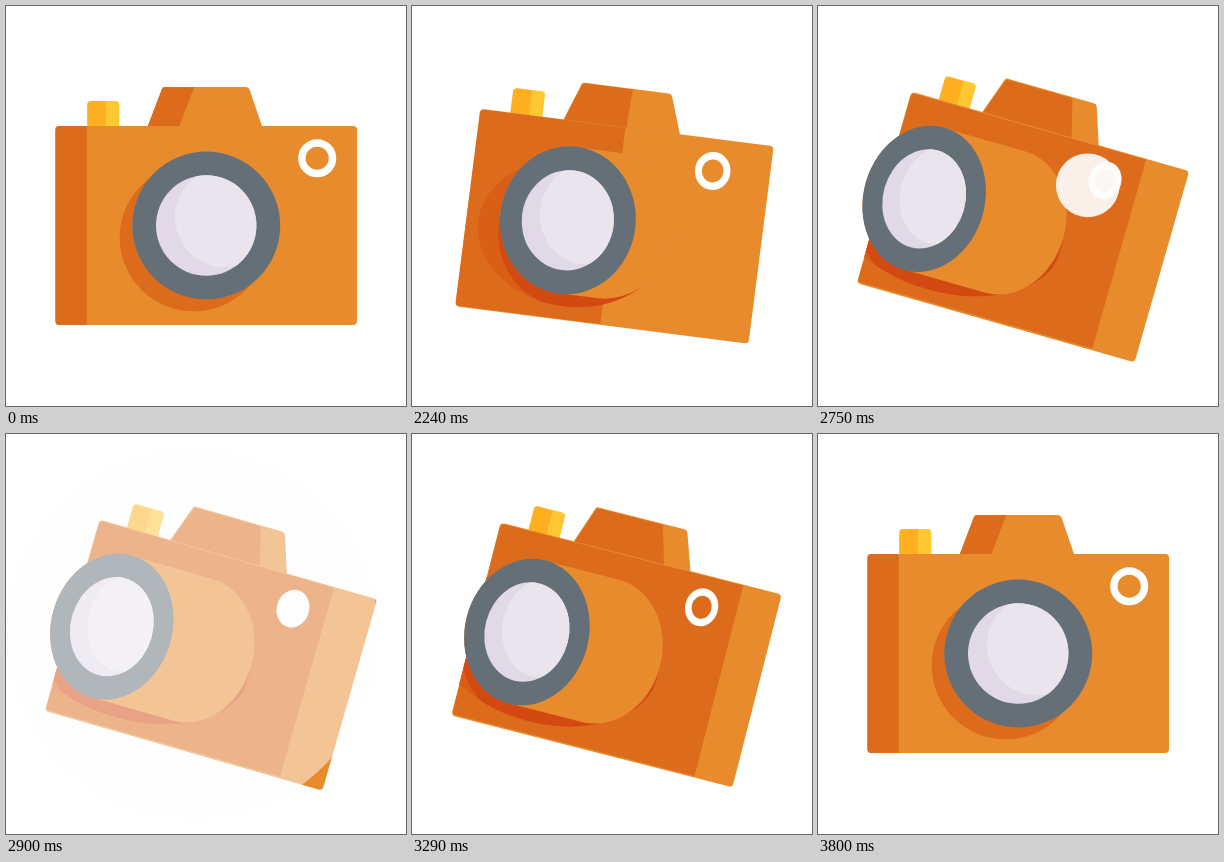
Write an HTML page with a canvas that moves like this. It is 400 by 400 pixels and loops after 3830 ms.

```html
<!DOCTYPE html>
<html lang="en">
<head>
<meta charset="utf-8">
<title>Camera</title>
<style>
html, body { margin: 0; width: 100%; height: 100%; overflow: hidden; background: #fff; }
canvas { display: block; width: 400px; height: 400px; }
</style>
</head>
<body>
<canvas id="stage" width="400" height="400"></canvas>
<script>
const ctx = document.getElementById('stage').getContext('2d');
const LOOP = 3830, MAX_ANGLE = 16;
const LIGHT = '#e88b2d', DARK = '#dc6b1b', SHADE = '#d95f16', DEEP = '#d24a11';

const clamp = v => Math.max(0, Math.min(1, v));

// cubic-bezier(.33, 0, .2, 1)
function ease(p) {
  let lo = 0, hi = 1;
  for (let i = 0; i < 24; i++) {
    const u = (lo + hi) / 2, v = 1 - u;
    if (3 * v * v * u * .33 + 3 * v * u * u * .2 + u ** 3 < p) lo = u; else hi = u;
  }
  return lo * lo * (3 - 2 * lo);
}

// 0 = facing front, 1 = fully turned
function turnAt(t) {
  const p = t < 2900 ? (t - 1985) / 840 : (3800 - t) / 820;
  return p <= 0 ? 0 : p >= 1 ? 1 : ease(p);
}

function fill(path, color) {
  ctx.fillStyle = color;
  ctx.fill(path);
}

function ellipse(x, y, rx, ry = rx) {
  const path = new Path2D();
  path.ellipse(x, y, rx, ry, 0, 0, 7);
  return path;
}

function box(x1, y1, x2, y2, radius = 0) {
  const path = new Path2D();
  path.roundRect(x1, y1, x2 - x1, y2 - y1, radius);
  return path;
}

// Two equal ellipses joined by straight sides
function tube(x1, x2, y, rx, ry) {
  const path = new Path2D();
  path.ellipse(x1, y, rx, ry, 0, Math.PI / 2, Math.PI * 1.5);
  path.ellipse(x2, y, rx, ry, 0, -Math.PI / 2, Math.PI / 2);
  path.closePath();
  return path;
}

function trapezoid(bottomL, topL, topR, bottomR, top, rL, rR) {
  const path = new Path2D();
  path.moveTo(bottomL, -99);
  path.arcTo(topL, top, topR, top, rL);
  path.arcTo(topR, top, bottomR, -99, rR);
  path.lineTo(bottomR, -99);
  path.closePath();
  return path;
}

function drawBody(e, slide) {
  const half = 150.8 - 6.4 * e;
  const body = box(-half, -99.5, half, 99.5, 4);

  const bx = 3 * e;
  fill(box(-119 + bx, -124.5, -87 + bx, -98, [4, 4, 0, 0]), '#ffb021');
  fill(box(-100.3 + bx, -124.5, -87 + bx, -98, [0, 4, 0, 0]), '#ffc732');

  const bl = -58.5 - 12.5 * e, tl = -43.5 - 14 * e;
  fill(trapezoid(bl, tl, 42.5 - 5.5 * e, 56 - 5.5 * e, -138.5, 3, 4), LIGHT);
  fill(trapezoid(bl + e, tl + e, -12 + .11 * slide, -27 + .225 * slide, -138.5 + e, 3, 0), DARK);

  fill(body, LIGHT);
  fill(box(-half + .5 * e, -99.5 + e, -119.5 + slide, 99.5 - 1.8 * e, [4, 0, 0, 4]), DARK);
  return body;
}

function drawLens(e, angle, body) {
  const x = -6.45 * angle, base = -19 * e, sx = 1 - .0113 * angle;
  const rx = 74 * sx, shadow = ellipse(-12.5 - 63 * e, 12, 74 + 45 * e, 74);

  ctx.save();
  ctx.clip(body);
  fill(shadow, DARK);
  ctx.globalAlpha = clamp(3 * e);
  fill(shadow, SHADE);
  ctx.clip(shadow);
  fill(tube(x, base, 12, rx, 74), DEEP);
  ctx.restore();

  fill(tube(x, base, 0, rx, 73.5), LIGHT);

  ctx.save();
  ctx.translate(x, 0);
  ctx.scale(sx, 1);
  fill(ellipse(0, 0, 74), '#646f78');
  const glass = ellipse(0, 0, 50.2);
  fill(glass, '#e1d9e6');
  ctx.clip(glass);
  fill(ellipse(19, -8.5, 50.2), '#eae5ec');
  ctx.restore();
}

function drawWindow(e, flash) {
  ctx.save();
  ctx.translate(111 - 45 * e, -67.3);
  ctx.scale(1 - .15 * e, 1);
  ctx.strokeStyle = '#fff';
  ctx.lineWidth = 7.5;
  ctx.stroke(ellipse(0, 0, 15.3));
  if (flash > 0 && flash < 1) {
    ctx.globalAlpha = clamp(2 * Math.sin(Math.PI * flash));
    fill(ellipse(0, 0, 13), '#fff');
  }
  ctx.restore();
}

function draw(t) {
  const e = turnAt(t), angle = MAX_ANGLE * e;
  const slide = Math.min(16.2 * angle, 276 - 3.55 * angle);
  const flash = clamp((t - 2720) / 360);

  ctx.fillStyle = '#fff';
  ctx.fillRect(0, 0, 400, 400);

  ctx.save();
  ctx.translate(200.2 + .3 * angle, 219.5 + .1 * angle);
  ctx.rotate(angle * Math.PI / 180);
  const body = drawBody(e, slide);
  drawLens(e, angle, body);
  drawWindow(e, flash);
  ctx.restore();

  // Flash spreads out from the window while it fades
  if (flash > 0 && flash < 1) {
    ctx.globalAlpha = 1 - flash;
    fill(ellipse(287 - 200 * flash, 175 + 50 * flash, 370 * flash), '#fdfdfd');
    ctx.globalAlpha = 1;
  }
}

function tick() {
  draw(performance.now() % LOOP);
  requestAnimationFrame(tick);
}
tick();
</script>
</body>
</html>
```
